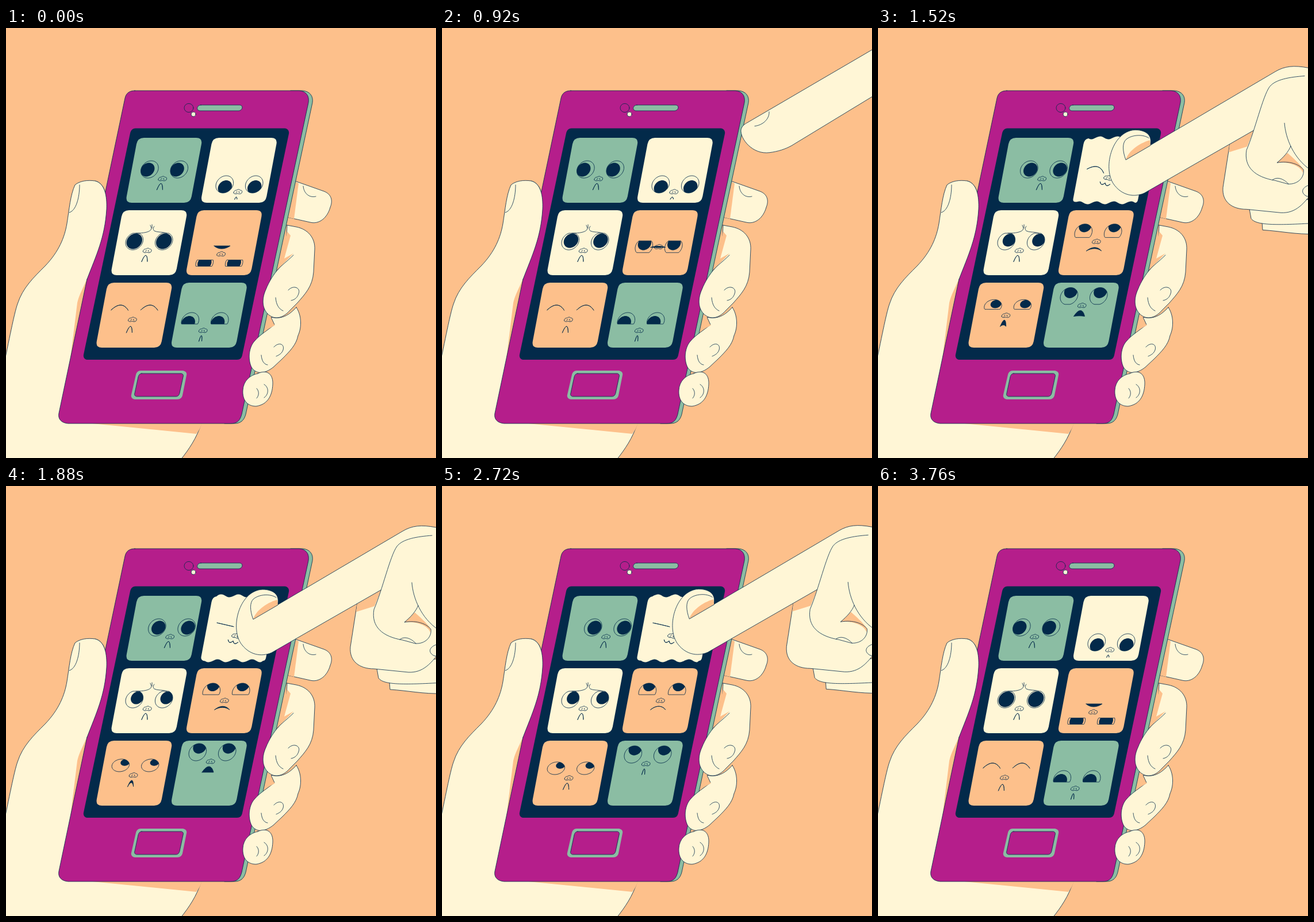
An HTML page for the animation above (3840 ms loop, 748 px wide and 748 px high).

```html
<!DOCTYPE html>
<html lang="en">
<head>
<meta charset="utf-8">
<title>Phone faces</title>
<style>
  html, body { margin: 0; width: 100%; height: 100%; overflow: hidden; background: #fdc08b; }
  svg { display: block; width: 100%; height: 100%; }
  .skin { fill: #fff6d6; }
  .shade { fill: #fdc08b; }
  .pink { fill: #b51e8b; }
  .mint { fill: #8bbda3; }
  .navy { fill: #032a4a; }
  .line { fill: none; }
  .ink { stroke: #032a4a; stroke-width: .8; stroke-linecap: round; stroke-linejoin: round; }
</style>
</head>
<body>
<svg viewBox="0 0 748 748">
  <!-- holding hand, behind the phone -->
  <g>
    <path class="skin ink" d="M485,262 L505,267 L553,284 C566,289 569,300 564,312 C559,330 545,342 529,338 L480,327 Z"/>
    <path class="shade" d="M500,266 L509,270 L501,332 L485,328 Z"/>
    <path class="line ink" d="M517,275 C518,288 528,296 539,293"/>
    <path class="skin ink" d="M-5,592 C5,545 14,497 20,480 C29,452 48,434 68,414 C92,389 102,364 106,340 C110,315 112,290 120,273 C128,266 142,264 155,266 C172,270 176,292 175,315 L250,420 L380,640 L340,688 C331,714 319,732 303,752 L-5,752 Z"/>
    <path class="shade" d="M142,434 C133,455 127,464 124,478 L109,600 L200,600 L200,400 Z"/>
    <path class="shade" d="M130,686 L341,688 C338,696 335,701 331,706 Z"/>
  </g>
  <!-- phone -->
  <g>
    <path class="mint ink" d="M495,109 H516 C528,110 535,118 533,130 L417,672 C414,683 408,688 397,688 H380 Z"/>
    <path class="pink ink" d="M224,109 H510 C522,110 528,118 526,130 L410,672 C407,683 402,688 391,688 H108 C96,687 90,680 92,670 L207,122 C209,113 215,109 224,109 Z"/>
    <path class="navy" d="M225,174.500 H485 C490,175 493,179 492,184 L411,569 C410,574 407,577 402,577 H142 C137,577 134,573 135,568 L216,183 C217,178 220,175 225,174.500 Z"/>
    <ellipse class="line ink" cx="318" cy="139" rx="8" ry="7.6"/>
    <circle class="skin ink" cx="326" cy="150" r="4"/>
    <path class="mint ink" d="M339,134 H407 C413,135 412,143 405,144 H337 C330,143 332,134 339,134 Z"/>
    <path class="mint" d="M234,596 H308 C313,597 315,600 314,604 L307,639 C306,643 303,646 298,646 H224 C219,645 217,642 218,638 L226,603 C227,599 230,596 234,596 Z"/>
    <path class="pink ink" d="M236,601 H304 C308,601 309,604 308,607 L302,635 C301,639 299,641 295,641 H228 C224,641 223,638 224,635 L230,607 C231,603 233,601 236,601 Z"/>
  </g>
  <g id="faces"></g>
  <!-- thumb and fingertips, over the phone -->
  <g>
    <path class="skin" d="M155,266 C172,270 176,292 175,315 C172,365 157,395 141,437 L118,420 L122,300 Z"/>
    <path class="line ink" d="M155,266 C172,270 176,292 175,315 C172,365 157,395 141,437"/>
    <path class="line ink" d="M128,273 C128,295 122,318 110,321"/>
    <path class="skin ink" d="M489,343 L505,346 C525,350 538,365 537,385 L535,425 C533,450 520,463 507,478 L494,491 C484,503 468,510 455,497 C444,485 446,468 452,455 C458,440 466,428 474,419 C480,412 486,408 489,343 Z"/>
    <path class="shade" d="M489,354 L495,361 L484,401 L500,392 C488,405 480,412 474,420 Z"/>
    <path class="line ink" d="M500,395 C488,407 480,412 472,421 M491,456 C500,446 513,452 509,462 C507,469 502,473 496,474 M469,469 C470,482 475,489 482,492"/>
    <path class="skin ink" d="M505,486 C514,499 515,520 508,535 C505,551 494,562 480,576 L465,590 C450,602 435,603 427,590 C420,575 423,555 432,545 C441,534 455,526 467,516 L461,503 C480,508 494,498 505,486 Z"/>
    <path class="shade" d="M460,500 L462,512 L468,517 L455,524 Z"/>
    <path class="line ink" d="M466,555 C474,546 485,549 482,560 C480,566 475,569 470,571 M444,569 C445,580 449,585 455,586"/>
    <path class="skin ink" d="M438,601 C455,593 465,603 464,620 C463,640 455,655 435,658 C418,658 411,645 412,630 C413,614 424,604 438,601 Z"/>
    <path class="line ink" d="M449,620 C458,625 457,638 449,643 M436,627 C441,632 440,640 436,644"/>
  </g>
  <!-- pointing hand -->
  <g id="hand">
    <path class="skin ink" d="M667,340 L668,354 C700,356 725,362 760,361 L760,320 Z"/>
    <path class="skin ink" d="M644,312 L648,334 C656,346 690,346 760,342 L760,300 Z"/>
    <path class="skin ink" d="M611,203 L599,280 C597,305 615,318 640,318 L700,324 C725,325 740,310 760,280 L760,150 L652,181 Z"/>
    <path class="shade" d="M611,203 L653,180 L641,209 L609,219 Z"/>
    <path id="finger" class="skin ink"/>
    <path id="nailFlat" class="line ink" d="M414,243 C415,254 405,266 389,268"/>
    <g id="nailPressed">
      <path class="shade" d="M473,207 L430,232 C433,219 452,203 472,198 Z"/>
      <path class="line ink" d="M473,207 L430,232 C424,216 424,203 430,197 C440,188 460,187 470,194"/>
    </g>
    <path class="skin" d="M741,86 C715,88 690,92 680,105 C668,122 655,180 640,215 C635,245 655,262 690,268 L715,274 L760,290 L860,290 L860,86 Z"/>
    <path class="shade" d="M693,237 C701,230 707,224 711,220 C720,228 732,238 739,249 L738,255 C735,243 715,235 693,237 Z"/>
    <path class="line ink" d="M741,86 C715,88 690,92 680,105 C668,122 655,180 640,215 C635,245 655,262 690,268 L712,274 C730,275 741,262 739,249 C732,240 715,233 693,237 C704,228 713,218 717,208 M706,168 C708,195 722,230 752,250 M685,267 C694,260 706,266 713,274 M752,275 C738,278 732,288 744,295 L752,297"/>
  </g>
</svg>
<script>
const LOOP = 3840, STEP = 40, TAU = Math.PI * 2, EYE = 15;
const $ = id => document.getElementById(id);
const mix = (a, b, k) => a + (b - a) * k;
const clamp = (v, lo, hi) => Math.max(lo, Math.min(hi, v));
const ease = k => (k = clamp(k, 0, 1), k * k * (3 - 2 * k));

const add = (parent, tag, attrs) => {
  const el = document.createElementNS('http://www.w3.org/2000/svg', tag);
  for (const k in attrs) el.setAttribute(k, attrs[k]);
  return parent.appendChild(el);
};

// x,y: middle of the eyes; f: how far nose and mouth hang; px,py,pr: pupil;
// flat: height of the eyeball; top,bot,arc: lids; w,h,lo: mouth; rot: tilt; wave: tile ripple.
const REST = { f: 1, px: 0, py: 0, pr: 12, flat: 1, top: -15, bot: 15, arc: 0, w: 5, h: 11, lo: 11, rot: 0, wave: 0 };
const OPEN = { top: -15, bot: 15 };
const blink = (t, open) => [{ t, d: 80, top: 0, bot: 0 }, { t: t + 120, d: 80, ...open }];

// Each key starts to move at t and takes d (200 ms unless given).
const FACES = [
  { fill: '#8bbda3', pose: { x: 275.5, y: 246, px: -3.5, py: .5 }, keys: [
    ...blink(200, OPEN),
    { t: 1320, x: 288.5, px: 2.5 },
    { t: 2200, d: 80, w: 5, h: 9, lo: 4 },
    { t: 2480, h: 11, lo: 11 },
    { t: 2920, x: 279, y: 247, px: -3 },
    { t: 3040, d: 80, top: -4, bot: 4 },
    { t: 3200, x: 275.5, y: 246, px: -3.5, ...OPEN }] },
  { fill: '#fff6d6', pose: { x: 406, y: 272, f: .8, px: 1.5, py: 5, w: 2, h: 4, lo: 4 }, keys: [
    { t: 360, d: 160, w: 4, h: 3.5, lo: 3.5 },
    { t: 800, w: 2, h: 4, lo: 4 },
    { t: 1240, d: 160, y: 248, f: .85, rot: 13, top: -1, bot: -1, w: 9, h: -4, lo: -4, wave: 1 },
    { t: 2840, d: 160, x: 407, y: 262, f: .9, rot: 0, px: 2, py: 0, top: -10, bot: 10, wave: 0 },
    { t: 3400, d: 280, x: 406, y: 272, f: .8, px: 1.5, py: 5, w: 2, h: 4, lo: 4, ...OPEN }] },
  { fill: '#fff6d6', pose: { x: 249, y: 371, pr: 13.5, top: -14 }, keys: [
    { t: 320, px: 1, py: -1, pr: 12.5 },
    { t: 920, px: 4.5, py: -1, pr: 11.5 },
    { t: 1400, py: -2.5, pr: 11 },
    { t: 2880, px: 1, py: -.5, pr: 13 },
    { t: 3400, px: 0, py: 0, pr: 13.5 }] },
  { fill: '#fdc08b', pose: { x: 371, y: 409, f: -1, top: -5.5, bot: 5.5, w: 14, h: 0, lo: -5 }, keys: [
    { t: 360, d: 160, w: 13, h: -2, lo: -5 },
    { t: 760, d: 320, x: 383, y: 352, f: 1, py: -11, pr: 11, w: 13, h: 6, lo: 4, ...OPEN },
    { t: 1400, y: 358, f: .94, px: 1.5, py: -12, bot: 5 },
    { t: 2040, h: 6, lo: 6 },
    { t: 3440, d: 280, x: 371, y: 409, f: -1, px: 0, py: 0, pr: 12, top: -5.5, bot: 5.5, w: 14, h: 0, lo: -5 }] },
  { fill: '#fdc08b', pose: { x: 224, y: 487, f: 1.25, px: 3, py: -4, pr: 10, flat: .8, top: -5, bot: -5, arc: 9 }, keys: [
    { t: 960, x: 226, y: 483, f: .95, top: -15, bot: 0, arc: 0, lo: 0 },
    { t: 1440, x: 225, y: 486, f: 1.05, px: 7, py: -7, pr: 8, flat: .73, bot: 15, lo: 7 },
    { t: 2080, x: 224, y: 491, lo: 11 },
    { t: 3400, d: 240, y: 487, f: 1.25, px: 3, py: -4, pr: 10, flat: .8, top: -5, bot: -5, arc: 9 }] },
  { fill: '#8bbda3', pose: { x: 346, y: 510, px: -3, py: 3, bot: 5, w: 2.5, h: 10, lo: 10 }, keys: [
    ...blink(440, { top: -15, bot: 5 }),
    { t: 1320, d: 240, x: 359, y: 463, px: 2, py: -9, pr: 11.5, bot: 15, w: 10, lo: 0 },
    { t: 2040, d: 240, x: 358, y: 467, py: -10, w: 2.5, lo: 10 },
    { t: 2880, px: -3, py: -1, pr: 12 },
    { t: 3320, d: 280, x: 346, y: 510, py: 3, bot: 5 }] }
];

const NOSE = 'M-7,2 C-8,-1 -5,-3 -3,-2.5 C-1,-4.5 2,-4.5 3.5,-2.5 C6,-3 8,-1 7,2 C6,4.5 2,4 0,3 C-2,4 -6,4.5 -7,2 M-3,2 L-1.5,-.5 M3,2 L1.5,-.5';
const FOLD = 'M226,357 C240,357 249,355 252,351 C254,348 252,346 251,343 M254,342 L254,348 M258,345 C255,348 256,351 258,353 C264,356 272,354 280,357';

FACES.forEach((face, i) => {
  const g = $('faces');
  const x = 229 + (i % 2) * 130.5 - (i >> 1) * 26, y = 191 + (i >> 1) * 126;
  face.tile = add(g, 'path', { fill: face.fill, transform: `matrix(1 0 -.188 1 ${x} ${y})` });
  if (i === 2) add(g, 'path', { d: FOLD, class: 'line ink' });
  face.g = add(g, 'g', {});
  face.eyes = add(face.g, 'path', { class: 'line ink' });
  face.pupils = add(face.g, 'path', { class: 'navy' });
  face.nose = add(face.g, 'path', { d: NOSE, class: 'line ink' });
  face.mouth = add(face.g, 'path', { class: 'navy ink' });
});

function poseAt(face, t) {
  const p = { ...REST, ...face.pose };
  for (const { t: start, d = 200, ...goal } of face.keys) {
    if (t < start) break;
    for (const k in goal) p[k] = mix(p[k], goal[k], ease((t - start) / d));
  }
  return p;
}

// A disc kept inside the eyeball and between the lids.
function disc(p, side, cx, cy, r) {
  let d = '';
  for (let a = 0; a < 48; a++) {
    let x = cx + r * Math.cos(a / 48 * TAU), y = cy + r * Math.sin(a / 48 * TAU);
    const k = Math.min(1, EYE / Math.hypot(x, y));
    x *= k;
    y *= k * p.flat;
    const bend = p.arc * (x / EYE) ** 2;
    y = clamp(y, p.top + bend, p.bot + bend);
    d += `${a ? 'L' : 'M'}${(x + side * 25.7).toFixed(2)},${y.toFixed(2)}`;
  }
  return d + 'Z';
}

function tilePath(amp, t) {
  const S = 113, R = 11;
  if (amp < .01) return `M${R},0H${S - R}Q${S},0 ${S},${R}V${S - R}Q${S},${S} ${S - R},${S}H${R}Q0,${S} 0,${S - R}V${R}Q0,0 ${R},0Z`;
  const phase = 1.7 + (t - 2320) / 880 * TAU;
  const edge = (x, y, a) => `L${x},${(y + a * Math.sin(x / 30 * TAU + phase)).toFixed(2)}`;
  let d = `M0,${R}Q0,2 7,1`;
  for (let x = 9; x <= S - 9; x += 2) d += edge(x, 0, -2.5 * amp);
  d += `Q${S},1 ${S},${R}V${S - 6}Q${S},${S} ${S - 4},${S}`;
  for (let x = S - 7; x >= 7; x -= 2) d += edge(x, S, 2.5 * amp);
  return d + `Q0,${S} 0,${S - 7}Z`;
}

function mouthPath({ w, h, lo }, cat) {
  const k = -4 / 3, c = w * .4;
  if (cat && h < 0) return `M${-w},0Q${-w / 2},${-2 * h} 0,0Q${w / 2},${-2 * h} ${w},0Q${w / 2},${-2 * h} 0,0Q${-w / 2},${-2 * h} ${-w},0`;
  return `M${-w},0C${-c},${k * h} ${c},${k * h} ${w},0C${c},${k * lo} ${-c},${k * lo} ${-w},0`;
}

function drawFace(face, i, t) {
  const p = poseAt(face, t);
  p.arc += p.wave * 4.5 * (1 - Math.cos((t - 1880) / 880 * TAU));
  face.tile.setAttribute('d', tilePath(p.wave, t));
  face.g.setAttribute('transform', `translate(${p.x} ${p.y}) rotate(${p.rot}) matrix(1 0 -.2 1 0 0)`);
  face.eyes.setAttribute('d', disc(p, -1, 0, 0, EYE) + disc(p, 1, 0, 0, EYE));
  face.pupils.setAttribute('d', disc(p, -1, p.px, p.py, p.pr) + disc(p, 1, p.px, p.py, p.pr));
  face.nose.setAttribute('transform', `translate(0 ${16 * p.f})`);
  face.mouth.setAttribute('transform', `translate(-1 ${30 * p.f + p.h / 2})`);
  face.mouth.setAttribute('d', mouthPath(p, i === 1));
}

// Fingertip outline, free and pressed.
const FREE = [376, 262, 372, 264, 366, 268, 365, 275, 364, 290, 385, 318, 415, 314, 430, 312, 442, 308, 453, 302];
const PRESSED = [472, 207, 477, 192, 468, 180, 446, 180, 405, 182, 388, 250, 411, 277, 424, 293, 443, 298, 462, 290];

// Hand offset: [time, x, y].
const PATH = [[720, 410, -242], [1160, 47, -36], [1240, 47, -36], [1400, 0, 0], [2840, 0, 0], [2960, 47, -36], [3120, 280, -168], [3240, 460, -270]];

function handAt(t) {
  const n = PATH.findIndex(k => t < k[0]);
  if (n < 1) return PATH[n ? PATH.length - 1 : 0].slice(1);
  const [ta, ax, ay] = PATH[n - 1], [tb, bx, by] = PATH[n];
  let k = (t - ta) / (tb - ta);
  if (n === 1) k = 1 - (1 - k) ** 2;
  else if (ta < 2960) k = ease(k);
  return [mix(ax, bx, k), mix(ay, by, k)];
}

function drawHand(t) {
  const [x, y] = handAt(t);
  const press = ease((t - 1240) / 160) * (1 - ease((t - 2840) / 120));
  const rub = press * 4.5 * (1 - Math.cos((t - 1880) / 440 * TAU));
  $('hand').setAttribute('transform', `translate(${x + rub * .4} ${y - rub})`);
  const q = FREE.map((v, i) => mix(v, PRESSED[i], press).toFixed(2));
  $('finger').setAttribute('d', `M860,92 L748,72 C722,67 706,69 690,78.500 L${q[0]},${q[1]} C${q.slice(2)} L652,181 L700,220 L860,220 Z`);
  $('nailFlat').style.opacity = press < .5 ? 1 : 0;
  $('nailPressed').style.opacity = press < .5 ? 0 : 1;
}

const t0 = performance.now();
function draw() {
  const t = Math.floor(((performance.now() - t0) % LOOP) / STEP) * STEP;
  FACES.forEach((face, i) => drawFace(face, i, t));
  drawHand(t);
  requestAnimationFrame(draw);
}
draw();
</script>
</body>
</html>
```
